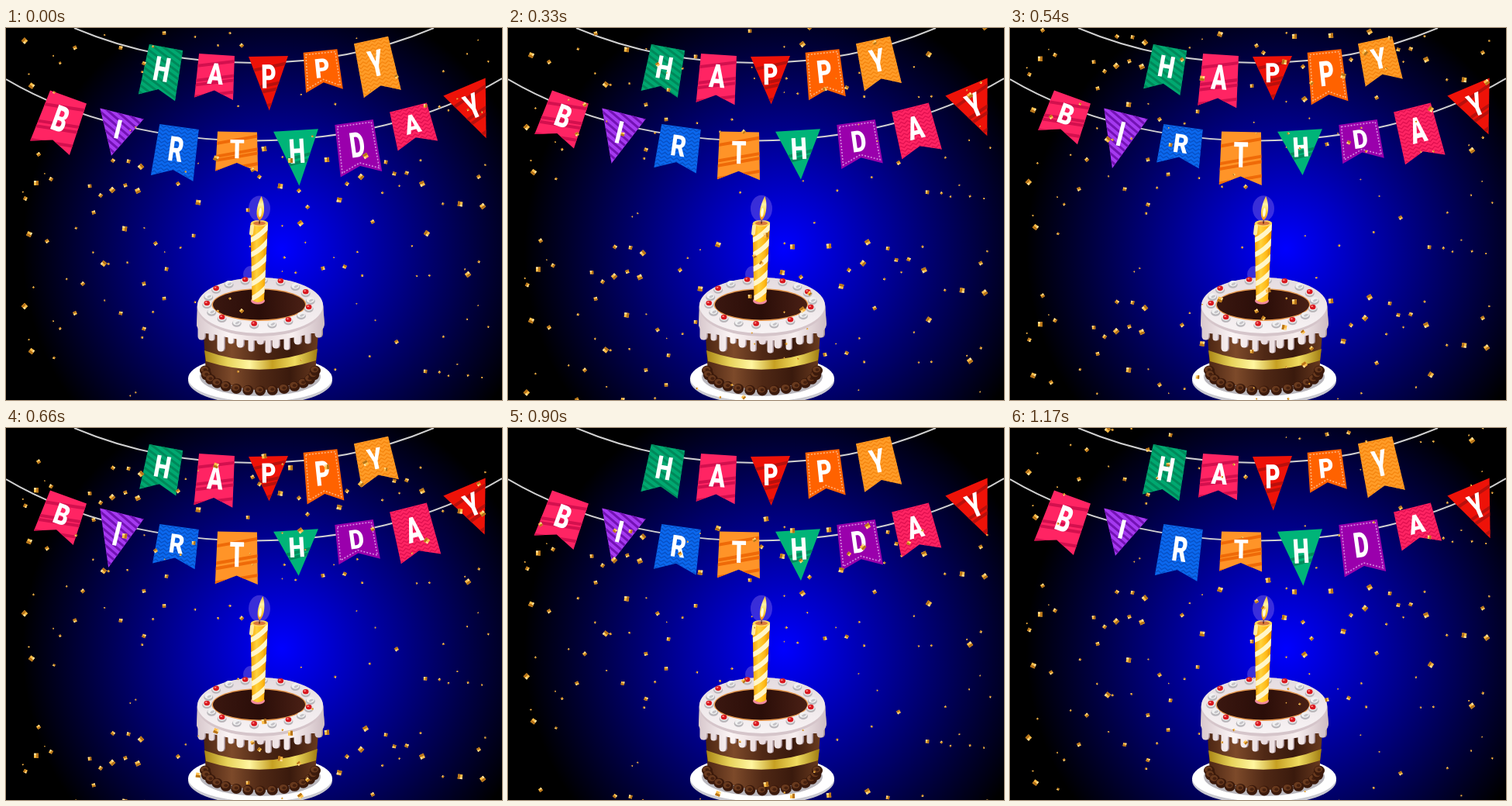
An HTML page with a canvas for the animation above (1200 ms loop, 640 by 480 pixels).

```html
<!DOCTYPE html>
<html lang="en">
<head>
<meta charset="utf-8">
<title>Happy Birthday</title>
<style>
  html, body { margin: 0; height: 100%; overflow: hidden; background: #000; }
  canvas { display: block; }
</style>
</head>
<body>
<canvas id="stage" width="640" height="480"></canvas>
<script>
const STEP = 30, STEPS = 40, TAU = Math.PI * 2;
const ctx = document.getElementById('stage').getContext('2d');

// letter, top centre x, y, tilt, top width, first and second height, colour, shade, pattern, triangle?
const flags = [
  ['H', 206.5, 25, 10.5, 44, 66, 58, '#00a870', '#00885a', 'stripes'],
  ['A', 272, 34.5, 4, 46, 57, 68, '#ff2463', '#d3104e', 'bands'],
  ['P', 338.5, 36.5, -1, 51, 70, 56, '#ee1208', '#b8100c', 'bands', true],
  ['P', 405.5, 29.5, -6, 44, 52, 69, '#ff6200', '#ffb27a', 'dots'],
  ['Y', 471, 15.5, -12, 45, 71, 55, '#ff9c28', '#f5850f', 'waves'],
  ['B', 80.5, 89, 20, 50, 70, 54, '#ff2463', '#d3104e', 'bands'],
  ['I', 149.5, 110.5, 14, 58, 56, 74, '#a53af0', '#7312b4', 'stripes', true],
  ['R', 223.5, 127.5, 8, 51, 67, 49, '#0b68ee', '#0750c4', 'waves'],
  ['T', 298.5, 134, 1, 51, 51, 70, '#ff9428', '#ef6a08', 'bands'],
  ['H', 374, 132, -3.5, 58, 72, 57, '#00b478', '#008c5c', 'band', true],
  ['D', 449, 121.5, -8, 50, 68, 49, '#9a00ac', '#d78be2', 'dots'],
  ['A', 519, 102.5, -14, 49, 51, 71, '#ff2463', '#e01050', 'waves'],
  ['Y', 591.5, 76, -23, 59, 72, 66, '#ee1208', '#b8100c', 'bands', true]
];

// x, y pairs of the larger confetti, big ones first
const BIG = 24;
const spots = [
  39,200, 137,209, 170,210, 30,266, 153,259, 126,304, 24,359, 248,225, 271,168, 333,156, 354,204, 367,171,
  414,170, 464,165, 458,192, 430,222, 537,201, 543,265, 586,227, 615,230, 596,318, 174,179, 33,417, 380,252,
  42,163, 25,220, 58,195, 138,171, 158,172, 108,204, 122,216, 154,203, 113,238, 53,275, 89,368, 148,368,
  178,330, 204,349, 178,388, 99,330, 207,311, 193,278, 222,201, 242,268, 318,183, 327,192, 378,210, 389,231,
  312,235, 440,201, 490,173, 501,188, 517,187, 473,250, 504,405, 437,308, 409,310, 304,365, 541,443, 610,192
];

function randomFrom(seed) {
  return () => (seed = (seed * 16807) % 2147483647) / 2147483647;
}
const rand = randomFrom(77);
const confetti = [];
for (let i = 0; i < spots.length; i += 2)
  confetti.push({ x: spots[i], y: spots[i + 1], size: i / 2 < BIG ? 6 : 4.4, turn: rand() * TAU });
for (let i = 0; i < 62; i++)
  confetti.push({ x: 18 + rand() * 618, y: 165 + rand() * 325, size: 1.3 + rand() * 1.5, turn: rand() * TAU });

function layer(paint) {
  const c = document.createElement('canvas');
  c.width = 640; c.height = 480;
  paint(c.getContext('2d'));
  return c;
}

function oval(g, x, y, rx, ry, fill, turn = 0) {
  g.beginPath();
  g.ellipse(x, y, rx, ry, turn, 0, TAU);
  g.fillStyle = fill;
  g.fill();
}

function shape(g, path, fill) {
  g.fillStyle = fill;
  g.fill(new Path2D(path));
}

function ramp(g, x0, y0, x1, y1, ...colors) {
  const r = g.createLinearGradient(x0, y0, x1, y1);
  colors.forEach((c, i) => r.addColorStop(i / (colors.length - 1), c));
  return r;
}

const backdrop = layer(g => {
  const glow = g.createRadialGradient(356, 285, 0, 356, 285, 335);
  glow.addColorStop(0, '#0000ff');
  glow.addColorStop(1, '#000');
  g.fillStyle = glow;
  g.fillRect(0, 0, 640, 480);
  g.strokeStyle = '#d0d0d0';
  g.lineWidth = 2;
  g.stroke(new Path2D('M88 0C230 60 410 60 552 0M0 66C180 172 460 172 640 65'));
});

function paintCake(g) {
  oval(g, 328, 455, 93, 31, '#c9c9d0');
  oval(g, 328, 452, 93, 30, '#fff');
  oval(g, 328, 450, 78, 25, '#b9b7bd');

  shape(g, 'M254 380L258 446Q328 488 399 446L404 380Z',
    ramp(g, 254, 0, 404, 0, '#4a2412', '#7d4a2a', '#4f2815', '#3a1a0d', '#6b3c20'));
  shape(g, 'M256 416Q328 443 402 414L400 429Q328 452 258 430Z',
    ramp(g, 256, 0, 402, 0, '#a88414', '#e8d35a', '#fff6a0', '#c6a022', '#f0dc60', '#a07c10'));

  for (let i = 0; i <= 14; i++) {
    const a = Math.PI * (1 - i / 14), x = 328 + 71 * Math.cos(a), y = 442 + 26 * Math.sin(a);
    oval(g, x, y, 7, 6.5, '#3b1a0c');
    oval(g, x - 1, y - 1.5, 5, 4, '#693a1e');
    oval(g, x, y - 1, 2.5, 2, '#45200f');
  }

  // icing with drips
  const icing = ramp(g, 246, 0, 411, 0, '#d8c8cd', '#fbf4f4', '#e8dadd', '#f7eeee', '#cdbcc2');
  const drips = [252, 398, 265, 400, 277, 413, 290, 404, 302, 408, 316, 414, 328, 404, 338, 416,
    348, 409, 362, 412, 376, 404, 389, 404, 403, 395];
  g.lineCap = 'round';
  for (const [dx, color] of [[1.5, '#a08a90'], [0, icing]]) {
    shape(g, 'M247 357L246 384Q250 396 264 394Q328 413 394 394Q409 395 411 382L409 357Z', color);
    g.strokeStyle = color;
    for (let i = 0; i < drips.length; i += 2) {
      g.lineWidth = i % 4 ? 7 : 9;
      g.beginPath();
      g.moveTo(drips[i] + dx, 380);
      g.lineTo(drips[i] + dx, drips[i + 1]);
      g.stroke();
    }
  }
  oval(g, 328, 360, 81.5, 38, '#d5c5ca');
  oval(g, 328, 358, 81, 36, ramp(g, 0, 322, 0, 394, '#e5dce0', '#f8f3f4'));
  oval(g, 326.5, 357, 61, 21, '#e79a50');
  oval(g, 326.5, 357, 59.5, 19.5, ramp(g, 267, 0, 386, 0, '#3a1710', '#2a0d08', '#4a2015'));

  for (let i = 0; i < 18; i++) {
    const a = (255 + i * 20) * TAU / 360;
    const x = 326 + 67 * Math.cos(a), y = 354 + 29 * Math.sin(a);
    oval(g, x, y + 1, 6, 4.5, '#b9b6ba');
    oval(g, x, y - 0.5, 5, 3.7, '#f1f1f1');
    if (i % 2) {
      oval(g, x + 1, y, 3, 1.5, '#c6c4c8', -0.4);
    } else {
      oval(g, x, y - 1.5, 3.8, 3.3, '#d81820');
      oval(g, x - 1, y - 2.5, 1.4, 1, '#ff8b86');
    }
  }
}

function paintCandle(g) {
  oval(g, 325, 352, 9, 4.5, '#f08aa0');
  g.save();
  g.clip(new Path2D('M315.5 252L338 252L333 351Q325 357 317.5 351Z'));
  g.fillStyle = ramp(g, 316, 0, 338, 0, '#f6a50c', '#ffd23c', '#ffba18', '#e38b00');
  g.fillRect(310, 245, 35, 115);
  g.strokeStyle = '#fff6c8';
  g.lineWidth = 6;
  for (let y = 270; y < 385; y += 19) {
    g.beginPath();
    g.moveTo(312, y + 5);
    g.quadraticCurveTo(328, y, 342, y - 19);
    g.stroke();
  }
  g.restore();
  oval(g, 327, 252, 11.2, 4.2, '#ffd65a');
  oval(g, 327, 252, 8, 2.6, '#d9763c');
  g.strokeStyle = '#ffeaa0';
  g.lineWidth = 5;
  g.stroke(new Path2D('M317.5 256L316.5 265'));
  g.strokeStyle = '#5b2a12';
  g.lineWidth = 1.5;
  g.stroke(new Path2D('M327 252L327.5 244'));
}

const cake = layer(g => {
  oval(g, 316, 318, 10, 11, 'rgba(125,105,225,.45)');
  paintCake(g);
  paintCandle(g);
});

function paintPattern(kind, color, w, h) {
  ctx.strokeStyle = color;
  ctx.beginPath();
  if (kind === 'dots') {
    ctx.lineWidth = 1.6;
    ctx.setLineDash([2, 2]);
    ctx.moveTo(3 - w / 2, 3);
    ctx.lineTo(w / 2 - 3, 3);
    ctx.lineTo(w / 2 - 1, h - 5);
    ctx.lineTo(0, h - 15);
    ctx.lineTo(1 - w / 2, h - 5);
    ctx.closePath();
  } else if (kind === 'waves') {
    ctx.lineWidth = 1.3;
    for (let y = 2; y < h + 8; y += 5)
      for (let x = -36; x <= 36; x += 4)
        ctx[x > -36 ? 'lineTo' : 'moveTo'](x, y + (x % 8 ? 1.5 : -1.5));
  } else if (kind === 'stripes') {
    ctx.lineWidth = 3;
    for (let y = -30; y < h + 40; y += 8) {
      ctx.moveTo(-36, y - 18);
      ctx.lineTo(36, y + 18);
    }
  } else {
    ctx.lineWidth = 4;
    const at = kind === 'band' ? [0.48, 0.58] : [0.2, 0.53, 0.63, 0.9];
    for (const k of at) {
      ctx.moveTo(-36, h * k + 7);
      ctx.lineTo(36, h * k - 7);
    }
  }
  ctx.stroke();
  ctx.setLineDash([]);
}

function paintFlag([letter, x, y, tilt, w, h0, h1, color, shade, pattern, triangle], swing) {
  const h = h0 + (h1 - h0) * swing, half = w / 2;
  ctx.save();
  ctx.translate(x, y);
  ctx.rotate(tilt * TAU / 360);
  ctx.save();
  ctx.beginPath();
  ctx.moveTo(-half, 0);
  ctx.lineTo(half, 0);
  if (triangle) {
    ctx.lineTo(0, h);
  } else {
    ctx.lineTo(half + 2, h);
    ctx.lineTo(0, h - 11);
    ctx.lineTo(-half - 2, h);
  }
  ctx.closePath();
  ctx.clip();
  ctx.fillStyle = color;
  ctx.fillRect(-40, -5, 80, 90);
  paintPattern(pattern, shade, w, h);
  ctx.restore();

  ctx.translate(0, h * (triangle ? 0.37 : 0.43));
  ctx.scale(1, h / (triangle ? 49 : 45));
  ctx.fillStyle = '#fff';
  ctx.fillText(letter, 0, 10.7);
  ctx.restore();
}

function paintFlame(n) {
  const lean = (1 - Math.cos(n * TAU / 4.7)) / 2;
  oval(ctx, 327, 233, 14, 16.5 + lean, 'rgba(135,110,235,.42)');
  const tip = 329.5 + 2.5 * lean, left = 321.5 + 2 * lean;
  shape(ctx, `M327 248C${left} 244 ${left + 1} 231 ${tip} 217C${335 + lean} 229 ${334 - 2 * lean} 245 327 248Z`,
    ramp(ctx, 0, 217, 0, 248, '#ffc32e', '#fff3a8', '#ffd43c', '#f08a18'));
  oval(ctx, 328, 238, 1.8, 6, '#fffce0', 0.1);
}

function paintConfetti(n) {
  const fall = 10.13 * (n % 35);
  for (const { x, y, size, turn } of confetti) {
    for (const top of [y - 342.5, y]) {
      const at = top + fall;
      if (at < -6 || at > 486) continue;
      ctx.save();
      ctx.translate(x, at);
      ctx.rotate(turn);
      ctx.fillStyle = '#ffbe48';
      ctx.fillRect(-size / 2, -size / 2, size, size);
      ctx.fillStyle = '#b87418';
      ctx.fillRect(0, -size / 2, size / 2, size);
      ctx.fillStyle = '#ffe2a0';
      ctx.fillRect(-size / 2, -size / 2, size / 2, size / 3);
      ctx.restore();
    }
  }
}

function draw(now) {
  const n = Math.floor(now / STEP) % STEPS;
  const swing = 1 - Math.abs(1 - n / 19.5);
  ctx.drawImage(backdrop, 0, 0);
  ctx.font = '900 30px Roboto, sans-serif';
  ctx.textAlign = 'center';
  for (const flag of flags) paintFlag(flag, swing);
  ctx.drawImage(cake, 0, 0);
  paintFlame(n);
  paintConfetti(n);
  requestAnimationFrame(tick);
}

let start;
function tick(now) {
  start ??= now;
  draw(now - start);
}
requestAnimationFrame(tick);
</script>
</body>
</html>
```
